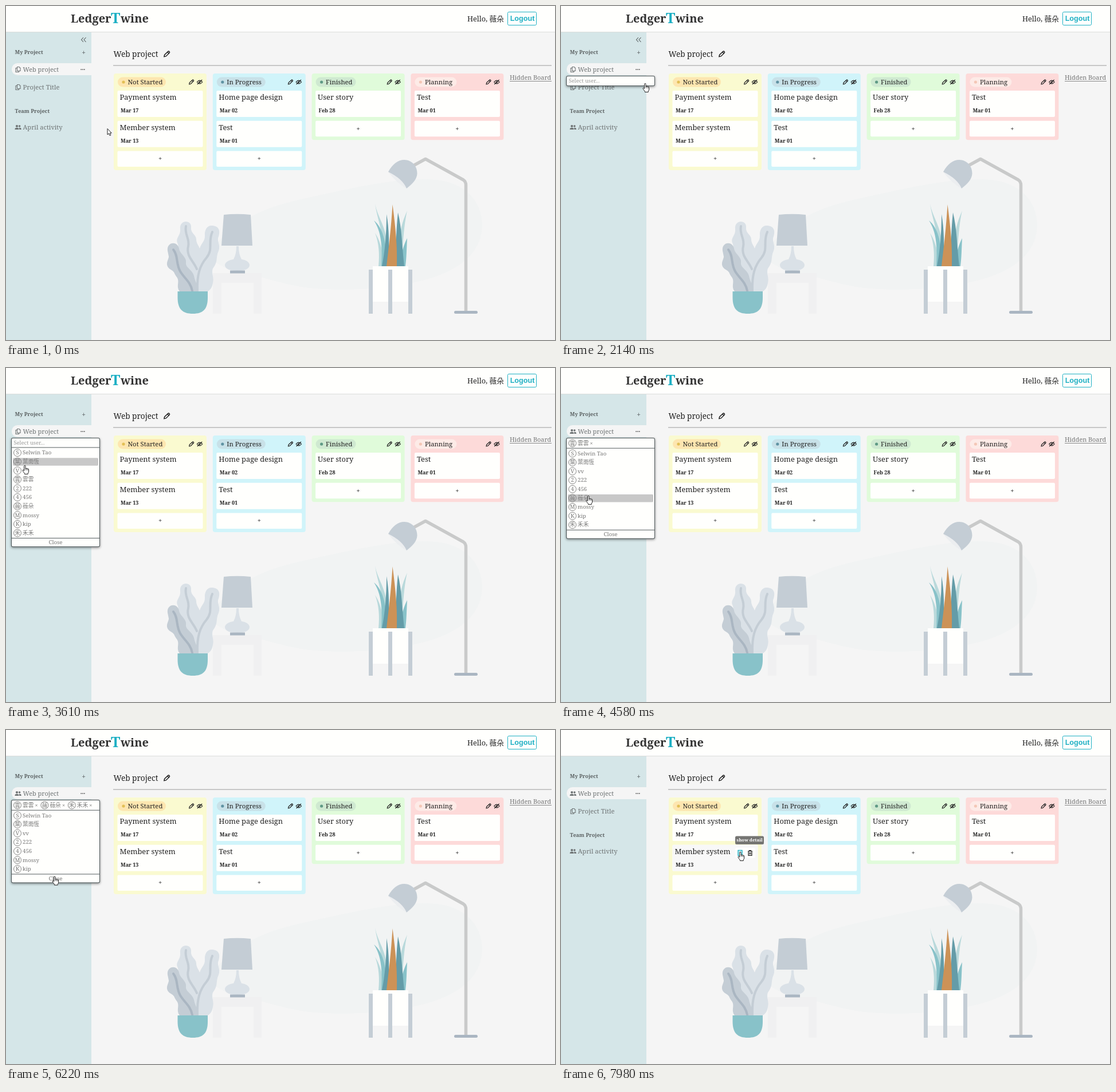
Animation, 958 px wide and 584 px high, one loop 8 s. Source, as an HTML page with a canvas:

```html
<!DOCTYPE html>
<html lang="zh-Hant">
<head>
<meta charset="utf-8">
<title>Project board</title>
<style>
html, body { margin: 0; width: 100%; height: 100%; overflow: hidden; background: #f5f5f5; }
canvas { display: block; width: 958px; height: 584px; }
</style>
</head>
<body>
<canvas id="stage"></canvas>
<script>
const W = 958, H = 584, LOOP = 8000;
const SERIF = '"Noto Serif", "Noto Sans CJK TC", "Noto Sans CJK JP", serif';
const SANS = '"Liberation Sans", Arial, sans-serif';
const WHITE = '#fffffd', TEAL = '#1eb0c4', GREY = '#6f7475';
const stage = document.getElementById('stage');
const dpr = window.devicePixelRatio || 1;
stage.width = W * dpr;
stage.height = H * dpr;
let ctx = stage.getContext('2d');

// ---- helpers ----
function text(str, x, y, size, color = '#222', o = {}) {
  ctx.font = `${o.bold ? 'bold ' : ''}${size}px ${o.family || SERIF}`;
  ctx.textAlign = o.align || 'left';
  ctx.fillStyle = color;
  ctx.fillText(str, x, y + size * 0.34);
}
function box(x, y, w, h, r, color) {
  ctx.beginPath();
  ctx.roundRect(x, y, w, h, r);
  ctx.fillStyle = color;
  ctx.fill();
}
function dot(x, y, r, color) {
  ctx.beginPath();
  ctx.arc(x, y, r, 0, 7);
  ctx.fillStyle = color;
  ctx.fill();
}
function fill(d, color) {
  ctx.fillStyle = color;
  ctx.fill(new Path2D(d));
}
function line(d, color, width = 1) {
  ctx.strokeStyle = color;
  ctx.lineWidth = width;
  ctx.stroke(new Path2D(d));
}
function at(x, y, draw, scale = 1) {
  ctx.save();
  ctx.translate(x, y);
  ctx.scale(scale, scale);
  draw();
  ctx.restore();
}

// ---- icons, centred on 0,0 ----
function pencil() {
  line('M-4 4 L-3.4 1.2 L2 -4 Q3 -4.6 4 -3.6 Q4.8 -2.6 4 -1.8 L-1.2 3.4 Z M1 -3 L3.2 -.8', '#222', 1.3);
}
function hiddenEye() {
  line('M-5 0 Q0 -6 5 0 Q0 6 -5 0 Z M-4.4 4.2 L4.4 -4.2', '#222', 1.2);
  dot(0, 0, 1.6, '#222');
}
function copies() {
  line('M-1.5 -4.5 H2 L4 -2.5 V2.5 H-1.5 Z M-1.5 -2.5 H-4 V4.5 H1.5 V2.5', GREY, 1.1);
}
function people() {
  dot(-2, -2, 2.1, GREY);
  dot(2.6, -2, 1.8, GREY);
  fill('M-5.5 4 V2.6 Q-5 .8 -2 .8 Q1 .8 1.4 2.6 V4 Z M2.2 4 V2.4 L1.6 .9 Q5.2 .4 5.6 2.6 V4 Z', GREY);
}
function trash() {
  line('M-4 -3 H4 M-1.5 -3 V-4.4 H1.5 V-3 M-3 -3 V4.3 H3 V-3 M-1 -1 V2.6 M1 -1 V2.6', '#222', 1.2);
}
function sheet() {
  line('M-3.4 -4.5 H3.4 V4.5 H-3.4 Z', TEAL, 1.5);
  line('M-1.8 -1.8 H1.8 M-1.8 .4 H1.8', TEAL, 1);
}

// ---- static scene ----
function lamps() {
  fill('M352 440 C380 385 440 355 510 339 C590 322 660 303 730 303 C795 302 828 335 831 380 C832 425 800 455 750 473 C690 494 600 499 540 494 C480 489 450 470 400 468 Z', '#f1f3f3');
  fill('M361 467 H446 V538 H432 V484 H376 V538 H361 Z', '#f0f0f1');
  fill('M380 365 Q403 362.5 427 365 L430 419 H376 Z', '#c4cdd5');
  fill('M402 420 H406 Q406 434 411 443 C419 444 425 448 425 453 C425 460 415 463 404 463 C392 463 382 460 382 453 C382 448 389 444 397 443 Q402 434 402 420 Z', '#dae1e7');
  box(391, 462.5, 26, 5, 0, '#aab6c2');

  ctx.lineJoin = 'round';
  line('M711 279 L732 267.5 L798 304 Q802.5 307 802.5 313 V534', '#c9caca', 5.5);
  ctx.lineJoin = 'miter';
  box(782, 533, 41, 5, 2.5, '#aab6c2');
  fill('M667 290 L673 286 L701 314 L699 319 Q682 310 667 290 Z', '#eceef0');
  fill('M667 290 C675 276 684 269 695 269 C708 269 718 280 717.5 293 C717 304 708 312 699 319 Q692 302 667 290 Z', '#c4cdd5');
}
function leftPlant() {
  ctx.lineCap = 'round';
  fill('M304 390 C302 373 325 373 323 388 C322 397 332 400 332 408 C332 415 336 418 338 424 C341 414 347 412 347 402 C346 390 352 383 360 384 C372 385 374 393 371 403 C367 410 375 418 371 428 C366 438 370 446 363 456 C356 464 364 474 361 484 C360 492 356 497 352 499 H310 L300 440 C294 430 304 424 299 414 C296 404 305 402 304 390 Z', '#dae1e7');
  line('M314 385 C311 400 321 406 318 420 C314 438 327 445 333 460', '#c4cdd5', 4);
  line('M360 395 C352 413 362 425 350 440 C338 454 333 470 334 498', '#c4cdd5', 4);
  fill('M282 428 C280 412 299 410 302 424 C303 434 316 438 314 450 C314 458 326 462 328 472 C330 484 337 490 336 499 H303 C296 490 304 482 298 474 C292 466 296 466 286 460 C276 452 284 444 284 438 Z', '#c4cdd5');
  line('M292 426 C301 437 296 450 304 464 C311 476 322 482 325 498', '#aab6c2', 4);
  ctx.lineCap = 'butt';
  fill('M299.5 499 H352 V510 C352 530 344 538 326 538 C308 538 299.5 530 299.5 510 Z', '#88c2c9');
}
function rightPlant() {
  fill('M644 346 C649 370 660 380 665 412 L660 424 C656 390 648 372 644 346 Z M650 455 C652 435 651 415 644 397 C656 415 659 440 659 455 Z M700 358 C695 380 694 400 691 434 L685 420 C687 395 691 378 700 358 Z', '#b9d9db');
  fill('M655 455 C657 420 655 395 642 375 C659 388 665 420 665 455 Z M687 455 C690 430 694 418 700 406 C699 425 699 440 697 455 Z', '#88c2c9');
  fill('M656 455 C661 430 664 400 664 364 C669 390 668 420 669 455 Z M680 455 C680 420 681 390 684 361 C691 390 691 420 695 455 Z', '#649ca8');
  fill('M664 455 C668 420 672 390 674.5 347 C680 390 683 420 682 455 Z', '#cc9257');
  box(640, 455, 62, 62, 0, WHITE);
  for (const x of [633, 667, 702]) box(x, 461, 7, 77, 0, '#c4cdd5');
}

const columns = [
  ['Not Started', 84, '#fafad0', '#fde6b0', '#e2bf55', [['Payment system', 'Mar 17'], ['Member system', 'Mar 13']]],
  ['In Progress', 85, '#d0f4fa', '#c8e1e8', '#5f93a3', [['Home page design', 'Mar 02'], ['Test', 'Mar 01']]],
  ['Finished', 70, '#e0fbda', '#cfe9d1', '#5f9a85', [['User story', 'Feb 28']]],
  ['Planning', 73, '#fddad9', '#fdebe7', '#f4c7b6', [['Test', 'Mar 01']]]
];
function card(x, y, [title, date], bg = WHITE) {
  box(x + 6.5, y, 149, 46, 2, bg);
  text(title, x + 10.5, y + 12, 12.8);
  text(date, x + 12, y + 35, 9.1, '#222', { bold: true });
}
function column([name, pillW, bg, pill, mark, cards], i) {
  const x = 188 + i * 172.8, addY = 148 + cards.length * 52.8;
  box(x, 118, 162, addY + 33.5 - 118, 4, bg);
  box(x + 7, 124.5, pillW, 17, 8.5, pill);
  dot(x + 17, 133, 2.6, mark);
  text(name, x + 24.5, 133, 11.3);
  at(x + 135.5, 133, pencil, 0.95);
  at(x + 150, 133, hiddenEye, 0.95);
  cards.forEach((c, k) => card(x, 148 + k * 52.8, c));
  box(x + 6.5, addY, 149, 27.5, 2, WHITE);
  text('+', x + 81, addY + 14, 11, '#222', { align: 'center' });
}
function header() {
  box(0, 0, W, 45, 0, WHITE);
  box(0, 45, W, 1, 0, '#dcdddc');
  text('Ledger', 113, 22.5, 20, '#333', { bold: true });
  text('T', 183, 21.5, 25, TEAL, { bold: true });
  text('wine', 200, 22.5, 20, '#333', { bold: true });
  text('Hello, 薇朵', 805, 23, 12.7);
  ctx.strokeStyle = TEAL;
  ctx.lineWidth = 1;
  ctx.beginPath();
  ctx.roundRect(875.5, 10.5, 50, 23, 2);
  ctx.stroke();
  text('Logout', 901, 21.5, 12.6, TEAL, { bold: true, family: SANS, align: 'center' });
}
function sidebar() {
  box(0, 46, 149, H - 46, 0, '#d5e6e8');
  box(10, 100, 139, 21, [10, 0, 0, 10], '#f5f5f5');
  text('My Project', 15.5, 80.5, 9.1, '#5c6263', { bold: true });
  text('+', 135.5, 82, 12, '#5c6263', { align: 'center' });
  text('Web project', 29.5, 111, 10.9, GREY);
  for (let i = -1; i < 2; i++) dot(134 + i * 2.8, 111, 0.9, '#555');
  at(21, 142, copies);
  text('Project Title', 29.5, 142, 11.2, GREY);
  text('Team Project', 15.5, 183.5, 9.1, '#5c6263', { bold: true });
  at(21, 212, people);
  text('April activity', 29.5, 212.5, 11.1, GREY);
}
function paintScene() {
  box(0, 0, W, H, 0, '#f5f5f5');
  lamps();
  leftPlant();
  rightPlant();
  header();
  sidebar();
  text('Web project', 187.5, 84, 13.6);
  at(280.5, 84, pencil, 1.15);
  box(187, 103.5, 765, 1, 0, '#9a9a9a');
  columns.forEach(column);
  text('Hidden Board', 879, 125, 10.85, '#777');
  box(879, 131, 73, 1, 0, '#888');
}
const scene = document.createElement('canvas');
scene.width = stage.width;
scene.height = stage.height;
const screen = ctx;
ctx = scene.getContext('2d');
ctx.scale(dpr, dpr);
paintScene();
ctx = screen;

// ---- motion ----
const path = [
  [0, 177, 214], [500, 177, 214], [1300, 134, 110], [1500, 134, 110],
  [2140, 147, 135], [2400, 147, 135], [3000, 60, 290], [3150, 60, 290],
  [3610, 33, 170], [3910, 37, 193], [4080, 37, 193], [4580, 48, 223],
  [4800, 48, 223], [5330, 57, 256], [6050, 57, 256], [6220, 85, 255.5],
  [7220, 85, 255.5], [7980, 313, 213], [8000, 313, 213]
];
const OPEN = 1510, LIST = 2350, CLOSE = 6510;
const users = ['Selwin Tao', '葉雨恆', 'vv', '雲雲', '222', '456', '薇朵', 'mossy', 'kip', '禾禾'];
const picks = [['雲雲', 4050], ['薇朵', 4770], ['禾禾', 5610]];

const clamp = v => Math.max(0, Math.min(1, v));
function pointer(t) {
  const i = path.findIndex(k => k[0] > t);
  const [t0, x0, y0] = path[i - 1], [t1, x1, y1] = path[i];
  const p = (t - t0) / (t1 - t0), e = p * p * (3 - 2 * p);
  return { x: x0 + (x1 - x0) * e, y: y0 + (y1 - y0) * e };
}

function badge(name, y, x = 20) {
  ctx.beginPath();
  ctx.arc(x, y, 6.5, 0, 7);
  ctx.strokeStyle = '#777';
  ctx.lineWidth = 0.9;
  ctx.stroke();
  text(name[0].toUpperCase(), x, y, 9.5, '#777', { align: 'center' });
  text(name, x + 9, y, 9.7, '#777');
}
function dropdown(t, cursor) {
  const chosen = picks.filter(p => t >= p[1]).map(p => p[0]);
  const rows = users.filter(u => !chosen.includes(u));
  const shift = chosen.length ? 1.3 : 0;
  const first = 148.1 + shift, pitch = 15.6;
  const end = first + rows.length * pitch - 7;
  const listed = t >= LIST;

  ctx.save();
  ctx.shadowColor = 'rgba(0,0,0,.45)';
  ctx.shadowBlur = 4 * dpr;
  ctx.shadowOffsetY = 1.5 * dpr;
  box(9, 122, 155, (listed ? end + 16 : 140) - 122, 3, '#4d5658');
  ctx.restore();
  box(10, 123, 153, (listed ? end + 15 : 139) - 123, 2, WHITE);

  if (!chosen.length) text('Select user...', 13.5, 131, 9.4, '#999');
  chosen.forEach((name, i) => {
    badge(name, 131.5, 20 + i * 47.4);
    text('×', 53 + i * 47.4, 131.5, 9, '#777', { align: 'center' });
  });
  if (!listed) return;

  box(10, 138.5 + shift, 153, 1, 0, '#555d5f');
  const hover = Math.round((cursor.y - first) / pitch);
  rows.forEach((name, i) => {
    const y = first + i * pitch;
    if (i === hover) box(12, y + 2 - 8.5, 149, 13.5, 2, '#c8c8c8');
    badge(name, y);
  });
  box(10, end, 153, 1, 0, '#555d5f');
  text('Close', 86.5, end + 8, 9.7, '#777', { align: 'center' });
}

function cardHover(cursor) {
  card(188, 200.8, columns[0][5][1], '#f8f8f8');
  box(304, 206, 35, 18, 3, WHITE);
  const onSheet = cursor.x > 304;
  at(312.5, 215, onSheet ? sheet : () => line('M-3.4 -4.5 H3.4 V4.5 H-3.4 Z M-1.8 -1.8 H1.8 M-1.8 .4 H1.8', '#222', 1.2));
  at(330, 215, trash);
  if (!onSheet) return;
  box(304, 185.5, 50, 14.5, 2.5, '#757572');
  text('show detail', 329, 192.5, 7.8, '#fff', { bold: true, align: 'center' });
}

function shape(d) {
  const p = new Path2D(d);
  ctx.lineJoin = 'round';
  ctx.fillStyle = '#fff';
  ctx.strokeStyle = '#222';
  ctx.lineWidth = 1;
  ctx.fill(p);
  ctx.stroke(p);
  ctx.lineJoin = 'miter';
}
function arrow() {
  shape('M0 .5 V11 L2.4 8.8 L4.1 12.6 L5.9 11.8 L4.3 8.1 H7.3 Z');
}
function hand() {
  shape('M-1.4 1.6 Q-1.2 .3 0 .4 Q1 .5 1 1.8 V6 Q1.8 5 3 5.8 Q4.2 5 5 6.3 Q6.6 5.8 6.6 7.6 V11 Q6.4 13 5.2 14 V15.6 H-.6 V14.2 Q-2.6 12 -4 9.4 Q-4 7.6 -2.4 8.4 L-1.4 9.6 Z');
  line('M1 6 V8.6 M3 6.2 V8.8 M5 6.6 V9', '#222', 0.7);
}

function draw(t) {
  const cursor = pointer(t);
  const open = t >= OPEN && t < CLOSE;
  const overCard = t > 7220 && cursor.x > 194.5;
  const overDots = t < OPEN && Math.hypot(cursor.x - 134, cursor.y - 110) < 9;

  ctx.setTransform(1, 0, 0, 1, 0, 0);
  ctx.drawImage(scene, 0, 0);
  ctx.scale(dpr, dpr);

  at(21, 111, t >= picks[0][1] ? people : copies);
  const fold = t < LIST ? 1 : t < CLOSE ? 0 : 1 - clamp((t - 7500) / 160);
  ctx.globalAlpha = fold;
  line('M135 55 L131.5 59 L135 63 M139.5 55 L136 59 L139.5 63', '#5c6263', 1.1);
  ctx.globalAlpha = 1;

  if (open) dropdown(t, cursor);
  if (overCard) cardHover(cursor);
  at(cursor.x, cursor.y, open || overCard || overDots ? hand : arrow);
}

function tick() {
  draw(performance.now() % LOOP);
  requestAnimationFrame(tick);
}
tick();
</script>
</body>
</html>
```
